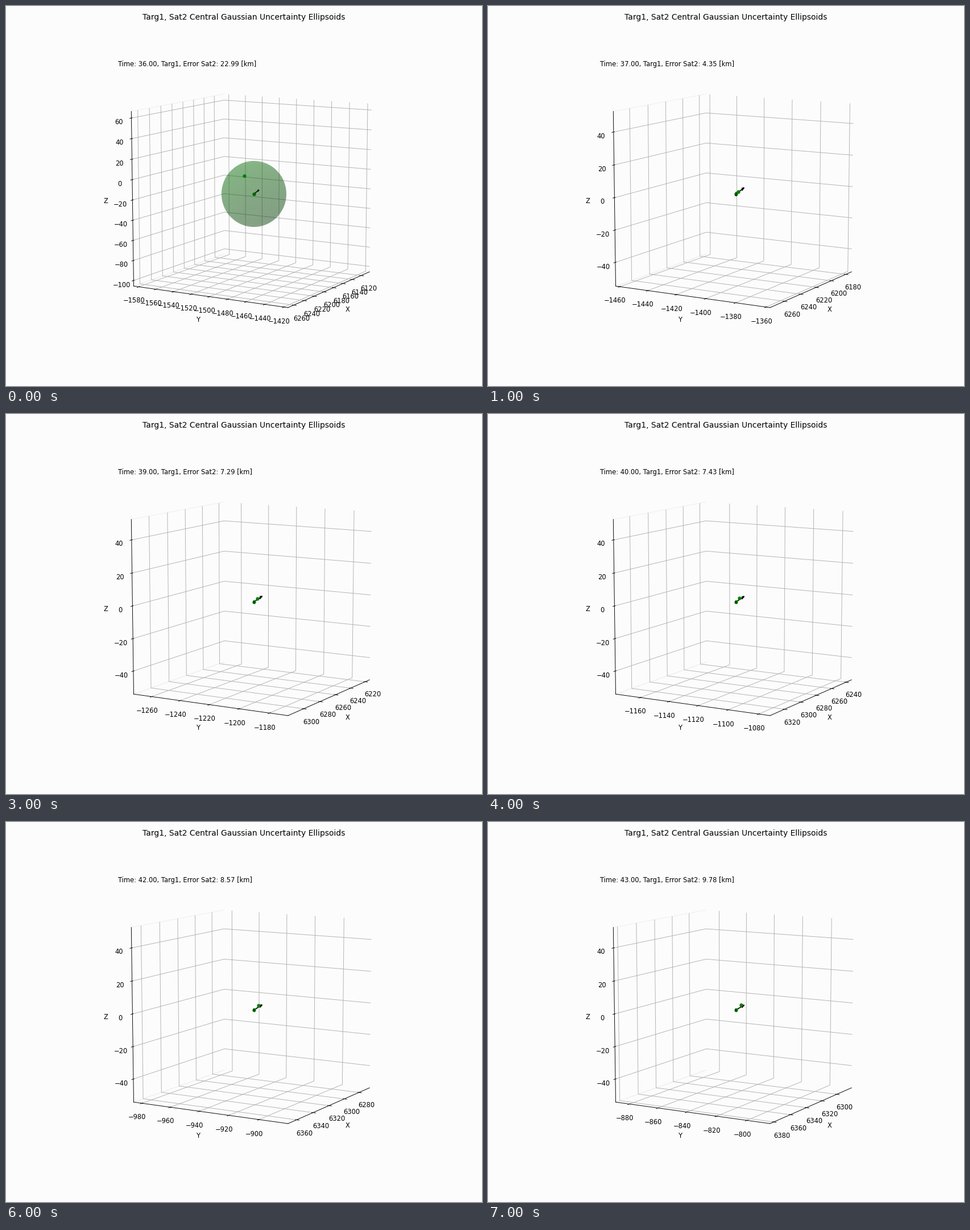
A matplotlib script that plays this animation: 837 by 669 pixels, repeating every 8 s.

```python
import numpy as np
import matplotlib.pyplot as plt
from matplotlib.animation import FuncAnimation

DPI = 83
ELEV, AZIM = 10, 30
BACKGROUND = "#fcfcfc"
STEPS = 8
TICK = 20

# Screen axes expressed in data space
e, a = np.radians([ELEV, AZIM])
RIGHT = np.array([-np.sin(a), np.cos(a), 0])
UP = np.array([-np.sin(e) * np.cos(a), -np.sin(e) * np.sin(a), np.cos(e)])
TOWARD = np.cross(RIGHT, UP)

u, v = np.meshgrid(np.linspace(0, 2 * np.pi, 50), np.linspace(0, np.pi, 50),
                   indexing="ij")
SPHERE = np.array([np.cos(u) * np.sin(v), np.sin(u) * np.sin(v), np.cos(v)])

fig = plt.figure(figsize=(837.01 / DPI, 669.01 / DPI), dpi=DPI,
                 facecolor=BACKGROUND)
fig.suptitle("Targ1, Sat2 Central Gaussian Uncertainty Ellipsoids")
ax = fig.add_subplot(projection="3d", computed_zorder=False,
                     facecolor=BACKGROUND)
ax.set_box_aspect((1, 1, 1))
ax.view_init(elev=ELEV, azim=AZIM)
ax.set(xlabel="X", ylabel="Y", zlabel="Z")
axes3 = (ax.xaxis, ax.yaxis, ax.zaxis)
for axis in axes3:
    axis.pane.fill = False
ax.xaxis.pane.set_edgecolor("none")
caption = ax.text2D(0.05, 0.95, "", transform=ax.transAxes)
artists = []


def settle(i):
    """Share of the initial estimation error left after i steps."""
    return 0.01 ** i


def estimate(i):
    """Estimated position on a slowly rising circular orbit."""
    radius = 6381.6 + 0.78 * i - 16.4 * settle(i)
    angle = 0.23801 - 0.015217 * i
    return np.array([radius * np.cos(angle), -radius * np.sin(angle),
                     -1 - 18.6 * settle(i)])


def error(i):
    return np.interp(i, [0, 1, 2, 4, 6, 7],
                     [22.99, 4.35, 7.14, 7.43, 8.57, 9.78])


def screen_vector(right, up, length):
    """Vector with given screen parts; the sign of length picks near or far."""
    depth = np.sign(length) * np.sqrt(length ** 2 - right ** 2 - up ** 2)
    return right * RIGHT + up * UP + depth * TOWARD


def dot(point, zorder):
    return ax.scatter(*point, s=20, color="green", depthshade=False,
                      zorder=zorder)


def update(i):
    while artists:
        artists.pop().remove()
    center, miss, rest = estimate(i), error(i), settle(i)
    radii = np.array([0.3, 0.3, 1.2]) + 31.4 * rest
    shell = center[:, None, None] + radii[:, None, None] * SPHERE
    truth = center + screen_vector((0.3 - 0.71 * rest) * miss,
                                   (0.3 + 0.47 * rest) * miss, miss)
    arrow = screen_vector(5, 4 - 0.15 * i, -10)
    artists.extend([
        ax.quiver(*center, *arrow, color="black", zorder=1),
        dot(center, 2),
        ax.plot_surface(*shell, color="green", alpha=0.28, linewidth=0,
                        zorder=3),
        dot(truth, 4),
    ])

    # Ticks stay inside the data range; the panes reach slightly beyond it
    half = 50 + radii
    for axis, mid, h in zip(axes3, center, half):
        first = TICK * np.ceil((mid - h) / TICK)
        axis.set_ticks(np.arange(first, mid + h, TICK))
    low, high = center - half * 25 / 24, center + half * 25 / 24
    ax.set_xlim(low[0], high[0])
    ax.set_ylim(low[1], high[1])
    ax.set_zlim(low[2], high[2])
    caption.set_text(f"Time: {36 + i:.2f}, Targ1, Error Sat2: {miss:.2f} [km]")
    return artists


anim = FuncAnimation(fig, update, frames=STEPS, interval=1000, repeat=True,
                     repeat_delay=0, blit=False)
plt.show()
```
